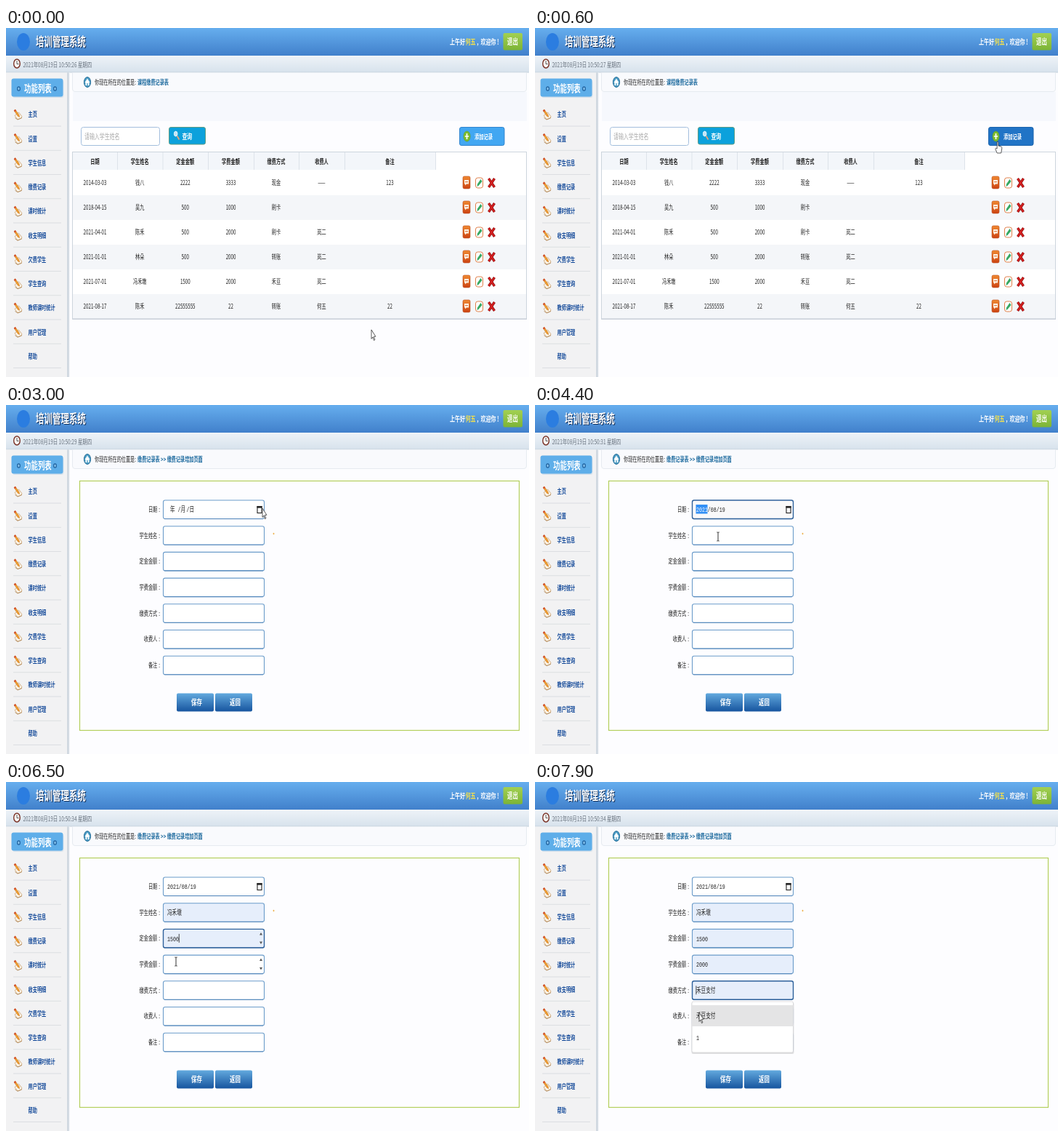
Write an HTML page that moves like this. It is 720 by 480 pixels and loops after 8000 ms.

```html
<!DOCTYPE html>
<html lang="zh-CN">
<head>
<meta charset="utf-8">
<title>培训管理系统</title>
<style>
  html, body { margin: 0; width: 100%; height: 100%; overflow: hidden; background: #fdfdff; }
  svg { display: block; width: 720px; height: 480px; }
  text { font-family: 'Noto Sans CJK SC', 'Noto Sans CJK', 'Noto Sans', sans-serif; white-space: pre; }
  .mono { font-family: 'Liberation Mono', 'Noto Sans CJK SC', 'Noto Sans CJK', monospace; }
  .bold { font-weight: 700; }
</style>
</head>
<body>
<svg viewBox="0 0 720 480" xmlns="http://www.w3.org/2000/svg">
  <defs>
    <linearGradient id="head" x2="0" y2="1"><stop stop-color="#66aeee"/><stop offset="1" stop-color="#4180cb"/></linearGradient>
    <linearGradient id="bar" x2="0" y2="1"><stop stop-color="#eef3f8"/><stop offset="1" stop-color="#d7e2ec"/></linearGradient>
    <linearGradient id="green" x2="0" y2="1"><stop stop-color="#a2d052"/><stop offset="1" stop-color="#7cb436"/></linearGradient>
    <linearGradient id="blue" x2="0" y2="1"><stop stop-color="#62a9de"/><stop offset="1" stop-color="#17559f"/></linearGradient>
    <linearGradient id="orange" x2="0" y2="1"><stop stop-color="#f08a32"/><stop offset="1" stop-color="#cc4312"/></linearGradient>
    <linearGradient id="edge"><stop stop-color="#b4c1cd"/><stop offset="1" stop-color="#fdfdff"/></linearGradient>
  </defs>
  <g id="frame"></g>
  <g id="list"></g>
  <g id="form"></g>
  <g id="live"></g>
</svg>
<script>
const LOOP = 8000, STEP = 100, FORM_AT = 1000;
const SQUEEZE = 0.675; // the whole page is shown narrower than it was laid out
const LINK = '#1d6a9e', INK = '#222';
const byId = id => document.getElementById(id);

function text(x, cy, str, size = 9.2, fill = INK, { cls = '', anchor = 'start' } = {}) {
  return `<text class="${cls}" transform="translate(${x} ${cy + size * 0.37}) scale(${SQUEEZE} 1)" ` +
    `font-size="${size}" fill="${fill}" text-anchor="${anchor}">${str}</text>`;
}
const bold = (x, cy, str, size, fill, anchor) => text(x, cy, str, size, fill, { cls: 'bold', anchor });
const mono = (x, cy, str, fill = INK) => text(x, cy, str, 9.8, fill, { cls: 'mono' });
const rect = (x, y, w, h, fill, extra = '') =>
  `<rect x="${x}" y="${y}" width="${w}" height="${h}" fill="${fill}" ${extra}/>`;
const path = (d, fill, extra = '') => `<path d="${d}" fill="${fill}" ${extra}/>`;
const stroke = (d, color, width = 1) => path(d, 'none', `stroke="${color}" stroke-width="${width}"`);
const oval = (x, y, rx, ry, fill, extra = '') =>
  `<ellipse cx="${x}" cy="${y}" rx="${rx}" ry="${ry}" fill="${fill}" ${extra}/>`;
const at = (x, y, body) => `<g transform="translate(${x} ${y})">${body}</g>`;

const noteIcon = path('M-4 1.5 1.5-3 5.8 2.5 5.2 5 0 6.8z', '#fbf4e6', 'stroke="#c9a070" stroke-width=".8"') +
  stroke('M-3.5 4.5 0 7 5.8 4.5', '#b08a5c', 0.9) +
  path('M-5-5.5-3.2-7 2 .5 2.6 3.4.2 2.2z', '#ef9f30', 'stroke="#c06a20" stroke-width=".5"') +
  path('M-5-5.5-3.2-7-2-5.3-3.9-3.8z', '#d2452c');

function buildFrame() {
  const menu = ['主页', '设置', '学生信息', '缴费记录', '课时统计', '收支明细', '欠费学生',
    '学生查询', '教师课时统计', '用户管理', '帮助'];
  let s = rect(0, 0, 720, 480, '#fdfdff') + rect(0, 0, 720, 38, 'url(#head)') +
    oval(24, 19, 9, 12, '#2b7de0') +
    bold(42, 20, '培训管理系统', 17, '#16325c') + bold(41, 19, '培训管理系统', 17, '#fff') +
    bold(611, 19, '上午好', 10.4, '#fff') + bold(632.5, 19, '何五', 10.4, '#f5e04a') +
    bold(647.5, 19, '，', 10.4, '#fff') + bold(653.5, 19, '欢迎你 !', 10.4, '#fff') +
    rect(684.5, 7, 26.5, 23.5, 'url(#green)', 'rx="2"') + bold(690, 19, '退出', 11, '#fff') +
    rect(0, 38, 720, 23, 'url(#bar)') + rect(0, 60.5, 720, 1, '#c6d1db') +
    oval(15, 49, 4.3, 6, '#fdfaf6', 'stroke="#7a3328" stroke-width="1.4"') +
    stroke('M15 45v4.5h2.5', '#444', 0.9) +
    rect(0, 61.5, 84.5, 419, '#f2f2f3') + rect(84.5, 61.5, 3.5, 419, 'url(#edge)') +
    rect(9, 72, 70.5, 24, '#d9e3ec', 'rx="3"') + rect(7.5, 69.5, 71, 25, '#5eaee9', 'rx="3"') +
    bold(25, 83, '功能列表', 14, '#fff');
  for (const x of [17.5, 67.5]) s += oval(x, 83.5, 1.8, 2.7, '#8cc8f2', 'stroke="#1d5f9c" stroke-width="1.2"');
  menu.forEach((name, i) => {
    const y = 119 + i * 33.25;
    if (i < menu.length - 1) s += at(16, y, noteIcon);
    s += bold(30.5, y, name, 9.2, '#1b4f9c') + rect(10, y + 15.5, 66, 1, '#dcdee1');
  });
  s += path('M91.5 61.5V84q0 3.5 3.5 3.5H713q3.5 0 3.5-3.5V61.5', '#f9fafd', 'stroke="#e6ebf0"') +
    oval(112, 74.5, 4.6, 7, '#4a9cc4', 'stroke="#2a6f99" stroke-width="1"') +
    path('M112 69.5 108.5 75h1v4h1.8v-3h1.4v3h1.8v-4h1z', '#fff') +
    text(122, 75, '你现在所在的位置是:', 9.1);
  return s;
}

function rowIcons(y) {
  return at(634, y - 0.5, rect(-5, -8.5, 10, 17, 'url(#orange)', 'rx="2" stroke="#b9481a" stroke-width=".6"') +
      path('M-3-3.5H3V2H0L-2 4V2H-3z', '#fff3e4') + stroke('M-2-.8H2', '#d0602a', 1)) +
    at(651.5, y, rect(-5, -7, 10, 14, '#fff', 'rx="3" stroke="#e0804a" stroke-width="1"') +
      path('M2-5 4-2-1 4-3 5-2.5 1.5z', '#36a862')) +
    at(668.5, y, stroke('M-4-6 4 6M4-6-4 6', '#8e1010', 3.4) + stroke('M-3.8-5.7 3.8 5.7M3.8-5.7-3.8 5.7', '#d81f1f', 2));
}

function buildList() {
  const edges = [92, 153, 215.5, 278, 341, 403, 466, 591];
  const heads = ['日期', '学生姓名', '定金金额', '学费金额', '缴费方式', '收费人', '备注'];
  const rows = [
    '2014-03-03 钱八 2222 3333 现金 —— 123',
    '2018-04-15 吴九 500 1000 刷卡',
    '2021-04-01 陈禾 500 2000 刷卡 岚二',
    '2021-01-01 林朵 500 2000 转账 岚二',
    '2021-07-01 冯禾墩 1500 2000 禾豆 岚二',
    '2021-08-17 陈禾 22555555 22 转账 何五 22'
  ];
  const mid = i => (edges[i] + edges[i + 1]) / 2;
  let s = text(181, 75, '课程缴费记录表', 9.1, LINK, { cls: 'bold' }) +
    rect(92, 88, 625, 40, '#f6f8fd') +
    rect(103.5, 136.5, 108, 25, '#fff', 'rx="3" stroke="#a3bedd"') +
    text(108, 149, '请输入学生姓名', 10.3, '#aaa') +
    rect(224.5, 136.5, 50, 23.5, '#0ca1dc', 'rx="2.5" stroke="#5f9c84"') +
    stroke('M235.5 148.5 238.5 153.5', '#e3a27a', 1.8) +
    oval(233.7, 145.5, 2.3, 3.4, '#bfe6f7', 'stroke="#e9f4fa" stroke-width="1"') +
    bold(242.5, 149, '查询', 10.2, '#fff') +
    rect(91.5, 170.5, 625, 230, '#fff', 'stroke="#cdd5dd"') + rect(92, 171, 499, 24, '#f3f6fa');
  edges.slice(1).forEach(x => s += rect(x, 171, 1, 24, '#dde3ea'));
  heads.forEach((name, i) => s += bold(mid(i), 183.5, name, 9.2, INK, 'middle'));
  rows.forEach((row, r) => {
    const y = 213 + r * 34;
    if (r % 2) s += rect(92, y - 17, 624, 34, '#f4f6f9');
    row.split(' ').forEach((cell, i) => s += text(mid(i), y, cell, 9.2, INK, { anchor: 'middle' }));
    s += rowIcons(y);
  });
  return s + rect(92, 399.5, 625, 1.2, '#c6ced6');
}

const fields = [
  { label: '日期', focus: 3700 },
  { label: '学生姓名', focus: 4700, fill: 5300, value: '冯禾墩' },
  { label: '定金金额', focus: 5600, fill: 6100, value: '1500', number: true },
  { label: '学费金额', focus: 6700, fill: 7100, value: '2000', number: true },
  { label: '缴费方式', focus: 7400, fill: 7700, value: '禾豆支付' },
  { label: '收费人' },
  { label: '备注' }
].map((f, i) => ({ ...f, cy: 143.5 + i * 35.7 }));

function buildForm() {
  let s = text(181, 75, '缴费记录表 &gt;&gt; 缴费记录增加页面', 9.1, LINK, { cls: 'bold' }) +
    rect(101.5, 104.5, 605, 343, 'none', 'stroke="#b4cf5c" stroke-width="1.2"') +
    oval(368.5, 177, 0.9, 1.2, '#eeb04a');
  for (const f of fields)
    s += text(208.3, f.cy, f.label, 9.2, INK, { anchor: 'end' }) + text(210.3, f.cy, ':', 9.2);
  [['保存', 235], ['返回', 288]].forEach(([name, x]) =>
    s += rect(x, 396.5, 51, 25, 'url(#blue)', 'rx="2"') + bold(x + 20, 409, name, 11, '#fff'));
  return s;
}

const cursorPath = [
  [0, 503, 415], [100, 508, 405], [500, 632, 165], [600, 637, 156], [1400, 636, 156],
  [1900, 610, 160], [2700, 365, 145], [3000, 353, 142], [3500, 350, 144], [3800, 320, 165],
  [4400, 252, 181], [4800, 246, 181], [5200, 240, 206], [5600, 238, 216], [6100, 236, 222],
  [6500, 234, 247], [6800, 233, 252], [7100, 231, 274], [7400, 229, 287], [7700, 226, 312], [7900, 226, 317]
];

function cursorAt(t) {
  const i = cursorPath.findIndex(k => k[0] > t);
  if (i < 0) return cursorPath[cursorPath.length - 1].slice(1);
  const [a, b] = [cursorPath[i - 1], cursorPath[i]];
  const u = (t - a[0]) / (b[0] - a[0]), ease = u * u * (3 - 2 * u);
  return [1, 2].map(n => a[n] + (b[n] - a[n]) * ease);
}

function cursor(kind, x, y) {
  const line = 'stroke="#333" stroke-width=".8" stroke-linejoin="round"';
  const shapes = {
    arrow: path('M0 0V12.5L1.9 10 3.5 14.7 4.9 13.8 3.3 9.3H5.9z', '#fff', line),
    hand: path('M-.9 1Q0-1 .9 1V6L5 7.2Q6.2 8 5.6 11L4.6 16H-.8L-3.2 10.5Q-3.2 8.3-.9 10z', '#fff', line),
    beam: stroke('M-1.7-6H-.4L0-5.4 .4-6H1.7M0-5.4V5.4M-1.7 6H-.4L0 5.4 .4 6H1.7', '#333', 1)
  };
  return at(x, y, shapes[kind]);
}

function dateField(t, f) {
  const chosen = t >= f.focus, focused = chosen && t < fields[1].focus;
  let s = rect(346, 139.5, 6, 9, 'none', 'stroke="#222" stroke-width="1.1"') + rect(345.5, 139, 7, 2.6, '#222');
  if (!chosen) return s + mono(226, f.cy, '年') + mono(236.5, f.cy, '/月') + mono(248.5, f.cy, '/日');
  if (focused) s += rect(221.5, 137, 16, 12.5, '#3390f5');
  return s + mono(222, f.cy, '2021', focused ? '#fff' : INK) + mono(237.8, f.cy, '/08/19');
}

function drawFields(t, [x, y]) {
  let s = '';
  fields.forEach((f, i) => {
    const next = fields[i + 1];
    const focused = t >= f.focus && !(next && t >= next.focus);
    const filled = t >= f.fill;
    const hovered = x > 216 && x < 356 && Math.abs(y - f.cy) < 13;
    s += rect(216.5, f.cy - 12.5, 139, 25.5, filled ? '#e6eefb' : focused && !i ? '#f9f9fa' : '#fff',
      `rx="2.5" stroke="${focused ? '#2f629c' : '#6b9cca'}" stroke-width="${focused ? 1.4 : 1.1}"`) +
      rect(218, f.cy + 12.6, 136, 1, focused ? '#2f629c' : '#5689bc');
    if (!i) s += dateField(t, f);
    if (filled) s += mono(222, f.cy, f.value);
    if (focused && i) s += rect(filled && f.number ? 237.8 : 221.5, f.cy - 6, 0.8, 12, INK);
    if (f.number && (focused || hovered))
      s += path(`M349 ${f.cy - 4.5}h4l-2-3.5zM349 ${f.cy + 4.5}h4l-2 3.5z`, '#555');
  });
  return s;
}

function suggestions(hovered) {
  return rect(215.5, 303, 141, 71, '#000', 'rx="2" opacity=".12"') +
    rect(216, 302, 139.5, 70, '#fff', 'rx="2" stroke="#d2d2d5" stroke-width=".8"') +
    (hovered ? rect(216, 307, 139.5, 29, '#e4e4e5') : '') +
    mono(222, 321.5, '禾豆支付') + mono(222, 351, '1');
}

function clock(t) {
  const ticks = [400, 1000, 2400, 3300, 4200, 4900, 5600, 6300];
  return 26 + ticks.filter(k => t >= k).length;
}

function draw(t) {
  const onForm = t >= FORM_AT, pos = cursorAt(t), [x, y] = pos;
  const menuOpen = t >= 7500;
  byId('list').setAttribute('display', onForm ? 'none' : 'inline');
  byId('form').setAttribute('display', onForm ? 'inline' : 'none');
  let kind = 'arrow';
  let s = text(23.5, 50, `2021年08月19日 10:50:${clock(t)} 星期四`, 9.5, '#6b7580');
  if (onForm) {
    s += drawFields(t, pos);
    if (menuOpen) s += suggestions(y > 307);
    const overField = fields.some(f => Math.abs(y - f.cy) < 13);
    if (x > 216 && x < 340 && overField && !(menuOpen && y > 302)) kind = 'beam';
  } else {
    const over = x > 624 && x < 686 && y > 136 && y < 167;
    if (over) kind = 'hand';
    s += rect(624.5, 136.5, 61.5, 25, over ? '#2174c6' : '#42a7f2', `rx="2.5" stroke="${over ? '#1c64ad' : '#3286cf'}"`) +
      oval(634.5, 149, 4.6, 7, '#7fbd2e', 'stroke="#5d9a20" stroke-width=".6"') +
      stroke('M634.5 145v8M631.8 149h5.4', '#fff', 1.6) + bold(645, 149.5, '添加记录', 9.3, '#fff');
  }
  byId('live').innerHTML = s + cursor(kind, x, y);
}

byId('frame').innerHTML = buildFrame();
byId('list').innerHTML = buildList();
byId('form').innerHTML = buildForm();

const start = performance.now();
let shown = -1;
function tick() {
  const t = Math.floor(((performance.now() - start) % LOOP) / STEP) * STEP;
  if (t !== shown) draw(shown = t);
  requestAnimationFrame(tick);
}
tick();
</script>
</body>
</html>
```
